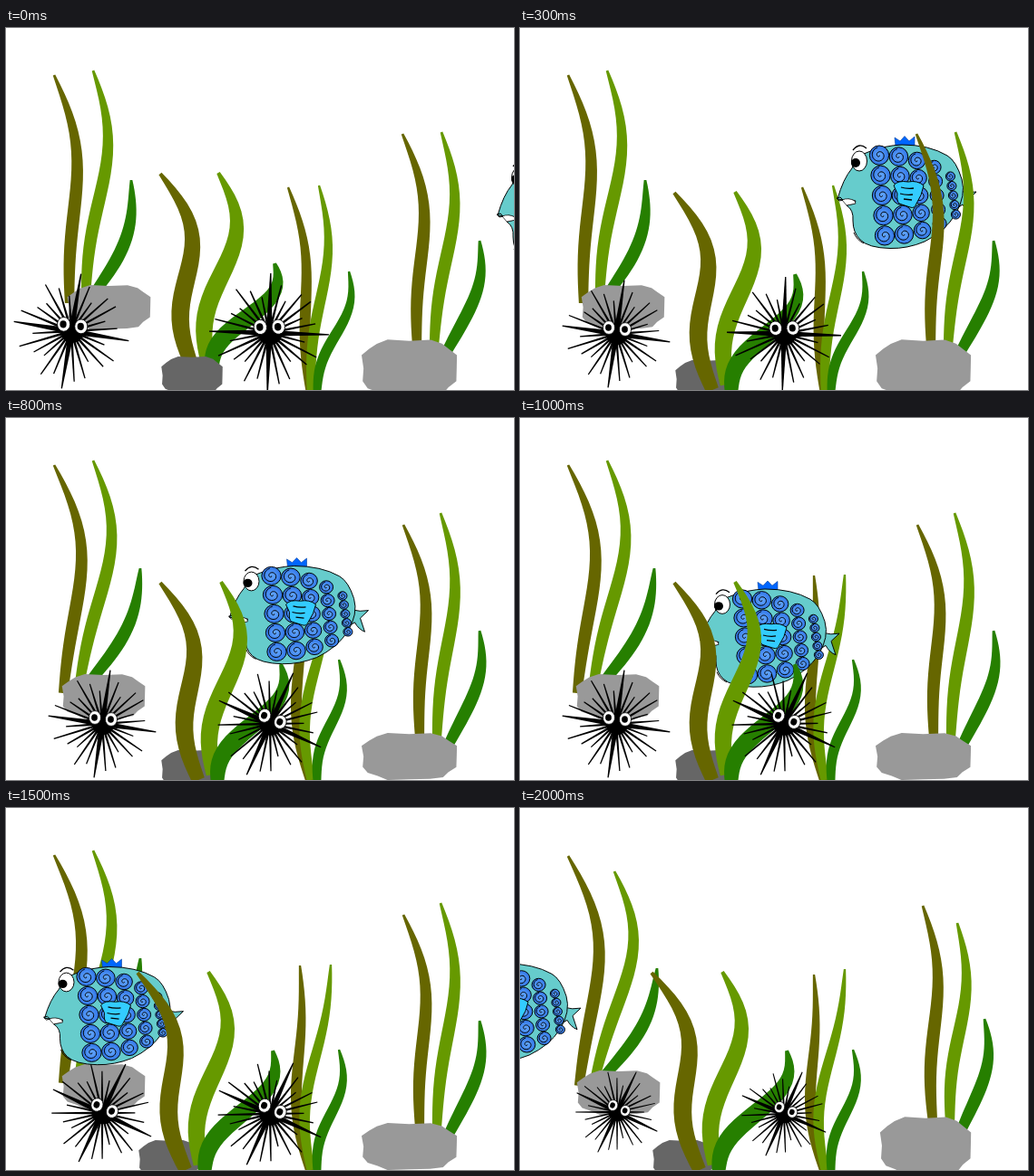
These frames come from a looping animation (560 by 400 pixels, 2100 ms). An HTML page with a canvas:

```html
<!DOCTYPE html>
<html lang="en">
<head>
<meta charset="utf-8">
<title>Reef</title>
<style>
  html, body { margin: 0; width: 100%; height: 100%; overflow: hidden; background: #fff; }
  canvas { display: block; }
</style>
</head>
<body>
<canvas id="stage" width="560" height="400"></canvas>
<script>
const ctx = document.getElementById('stage').getContext('2d');
const LOOP = 2100;
const WEED_COLORS = ['#666600', '#669900', '#267f00'];

// Each group has an olive, a green and a dark blade. Bends are [bow, curl].
// A pose sets the tips, moves the roots and scales the bow of the two tall blades.
const left = {
  width: 14,
  roots: [[70, 304], [88, 294], [95, 296]],
  bends: [[16, 6], [15, 7], [16, 0]],
  poses: [
    { tips: [[53, 52], [96, 47], [138, 168]], move: [0, 0], sway: 1 },
    { tips: [[53, 52], [96, 47], [148, 166]], move: [-7, 0], sway: 1.5 },
    { tips: [[53, 53], [104, 70], [151, 177]], move: [-5, 3], sway: 1.7 }
  ]
};
const middle = {
  width: 20,
  roots: [[212, 400], [228, 394], [233, 402]],
  bends: [[13, 14], [13, 14], [6, 14]],
  poses: [
    { tips: [[170, 161], [234, 160], [296, 260]], move: [-6, -24], sway: 1 },
    { tips: [[170, 182], [237, 181], [303, 272]], move: [0, 0], sway: 1 },
    { tips: [[145, 182], [223, 181], [294, 268]], move: [-14, 0], sway: 1 }
  ]
};
const near = {
  width: 12,
  roots: [[335, 402], [336, 400], [343, 402]],
  bends: [[8, 5], [9, 6], [5, 7]],
  poses: [
    { tips: [[311, 176], [345, 174], [378, 269]], move: [0, 0], sway: 1 },
    { tips: [[324, 174], [358, 173], [367, 267]], move: [0, 0], sway: -1 },
    { tips: [[324, 184], [358, 178], [367, 267]], move: [0, 0], sway: -1 }
  ]
};
const right = {
  width: 14,
  roots: [[453, 350], [472, 350], [481, 366]],
  bends: [[15, 6], [14, 6], [14, 2]],
  poses: [
    { tips: [[437, 117], [480, 115], [522, 235]], move: [0, 0], sway: 1 },
    { tips: [[438, 118], [479, 105], [522, 235]], move: [3, 2], sway: 1 },
    { tips: [[444, 108], [482, 127], [512, 233]], move: [2, -3], sway: 0.6 }
  ]
};

const BODY = new Path2D(`M294 199Q300 177 310 165Q314 151 328 147Q345 140 365 139Q395 139 415 151
  Q425 157 431 177Q436 195 424 216Q412 235 390 246Q371 254 352 253.5Q328 253 319 244Q311 236 311 223
  Q312 211 304 206L313 204L314 201Q306 198 300 200Z`);
const MOUTH = new Path2D('M299 200Q306 197 313 201L314 204L304 206Z');
const LIP = new Path2D('M293 198L297 197L300 200L296 201ZM312 236Q315 244 323 248');
const TAIL = new Path2D('M428 190Q438 193 447 191L438 200L443 216Q436 213 432 205L426 209Z');
const CROWN = new Path2D('M358 141L357 131L363 135L368 129.5L373 135L379 130L379 141Z');
const FIN = new Path2D('M356 184Q360 178 372 180Q382 178 389 184Q387 195 381 204Q379 210 374 208L362 204Q359 201 360 193Z');
const FIN_LINES = new Path2D('M364 186Q371 188 378 187M363 193Q370 195 377 194M367 199L376 200');
const BROW = new Path2D('M311 145Q318 136 326 143');

// Each pose is held and changes only what it names. Urchins: x, y, size, degrees.
const poses = [
  { at: 0, fish: [248, 8], tall: 1, left: 0, middle: 0, near: 0, right: 0,
    urchins: [[72, 335, 1.07, 1], [290, 337, 1.1, -7]] },
  { at: 100, fish: [152, -4], urchins: [[106, 338, 1.06, 0], [290, 338, 1.06, -7]] },
  { at: 300, fish: [56, -10], middle: 1, urchins: [[106, 338, 1, 0], [291, 338, 1.05, -7]] },
  { at: 500, fish: [0, 0], right: 1 },
  { at: 800, fish: [-47.5, 25], tall: 0.945, left: 1, near: 1,
    urchins: [[106, 338, 1, 0], [291, 338, 1.03, 16]] },
  { at: 1000, fish: [-95, 50.5] },
  { at: 1300, fish: [-123, 116], middle: 2, urchins: [[106, 337, 1, 17], [291, 338, 1.03, 16]] },
  { at: 1500, fish: [-251.5, 37] },
  { at: 1800, fish: [-316, 35], left: 2, right: 2, urchins: [[107, 336, 0.82, 17], [291, 338, 0.84, 15]] },
  { at: 2000, fish: [-380, 33.5], near: 2 }
];
poses.forEach((pose, i) => { poses[i] = { ...poses[i - 1], ...pose }; });

function paint(path, fill, stroke, width = 1) {
  if (fill) { ctx.fillStyle = fill; ctx.fill(path); }
  if (stroke) { ctx.strokeStyle = stroke; ctx.lineWidth = width; ctx.stroke(path); }
}

function ellipse(x, y, rx, ry = rx) {
  const path = new Path2D();
  path.ellipse(x, y, rx, ry, 0, 0, 7);
  return path;
}

function blade(tip, root, bow, curl, width, color) {
  const point = t => [
    tip[0] + (root[0] - tip[0]) * t + bow * Math.sin(Math.PI * t) + curl * Math.sin(2 * Math.PI * t),
    tip[1] + (root[1] - tip[1]) * t
  ];
  const path = new Path2D(), steps = 24;
  for (const side of [1, -1]) {
    for (let i = 0; i <= steps; i++) {
      const t = (side > 0 ? i : steps - i) / steps;
      const [x, y] = point(t), [nx, ny] = point(t + 0.01);
      const half = width / 2 * Math.sin(Math.PI * (0.03 + 0.75 * t)) ** 0.7;
      const k = side * half / Math.hypot(nx - x, ny - y);
      path.lineTo(x - (ny - y) * k, y + (nx - x) * k);
    }
  }
  paint(path, color);
}

function weeds({ width, roots, bends, poses }, index) {
  const { tips, move, sway } = poses[index];
  tips.forEach((tip, i) => {
    const root = [roots[i][0] + move[0], roots[i][1] + move[1]];
    const [bow, curl] = bends[i];
    blade(tip, root, i < 2 ? bow * sway : bow, curl, width, WEED_COLORS[i]);
  });
}

// A lumpy, squarish oval.
function rock(x, y, w, h, color) {
  const path = new Path2D();
  const squash = v => Math.sign(v) * Math.abs(v) ** 0.7;
  for (let i = 0; i < 20; i++) {
    const a = i / 20 * 2 * Math.PI, r = 0.48 + 0.02 * Math.sin(i * 2.4);
    path.lineTo(x + w * (0.5 + r * squash(Math.cos(a))), y + h * (0.5 + r * squash(Math.sin(a))));
  }
  paint(path, color);
}

function urchin([x, y, size, degrees]) {
  ctx.save();
  ctx.translate(x, y);
  ctx.rotate(degrees * Math.PI / 180);
  ctx.scale(size, size);
  for (let i = 0; i < 28; i++) {
    const thick = i % 7 === 0;
    const length = thick ? 60 : 46 + 10 * Math.sin(i * 4.3);
    const base = thick ? 3.2 : 1.4;
    ctx.save();
    ctx.rotate(0.15 + i / 28 * 2 * Math.PI);
    paint(new Path2D(`M0 ${-base}L${length} -.6V.6L0 ${base}Z`), '#000');
    ctx.restore();
  }
  paint(ellipse(1, 1, 12, 11), '#000');
  for (const [ex, ey] of [[-8, -7], [10, -5]]) {
    paint(ellipse(ex, ey, 6.6, 7.4), '#fff', '#000', 0.8);
    paint(ellipse(ex - 0.5, ey, 3.4, 3.8), '#000');
  }
  ctx.restore();
}

function scale(x, y, r) {
  const shade = ctx.createRadialGradient(x, y, 0, x, y, r);
  shade.addColorStop(0, '#66aaff');
  shade.addColorStop(1, '#2f74e6');
  paint(ellipse(x, y, r), shade, '#000');
  const spiral = new Path2D();
  for (let a = 0; a < 11; a += 0.3) {
    const d = r * a / 13;
    spiral.lineTo(x + d * Math.cos(a), y + d * Math.sin(a));
  }
  paint(spiral, null, '#000');
}

function fish([x, y], tall) {
  const top = 129.5;
  ctx.save();
  ctx.translate(x, y + top);
  ctx.scale(1, tall);
  ctx.translate(0, -top);
  paint(TAIL, '#66cccc', '#000');
  paint(CROWN, '#0066ff', '#003c99', 0.6);
  paint(BODY, '#66cccc', '#000');
  paint(MOUTH, '#fff', '#000', 0.7);
  paint(LIP, null, '#000');
  // Columns of scales shrink towards the tail.
  for (let col = 0; col < 5; col++) {
    const gap = 22.2 - 0.73 * col * col;
    for (let row = -2; row <= 2; row++) {
      scale(343 + 22 * col - 0.6 * col * col + 1.5 * row, 195 + gap * row, gap * 0.48);
    }
  }
  paint(FIN, '#33ccff', '#000');
  paint(FIN_LINES, null, '#000', 1.3);
  paint(ellipse(318, 157, 8.5, 11), '#fff', '#000');
  paint(ellipse(314, 159, 5), '#000');
  paint(BROW, null, '#000', 1.3);
  ctx.restore();
}

function draw(time) {
  const pose = poses.findLast(p => p.at <= time);
  ctx.fillStyle = '#fff';
  ctx.fillRect(0, 0, 560, 400);

  weeds(left, pose.left);
  rock(...[[66, 283], [60, 282], [61, 289]][pose.left], 95, 51, '#999');

  weeds(near, pose.near);
  fish(pose.fish, pose.tall);

  const stone = () => rock(pose.middle === 2 ? 145 : 170, pose.middle ? 366 : 362, 70, 44, '#666');
  if (pose.middle) stone();
  weeds(middle, pose.middle);
  if (!pose.middle) stone();

  weeds(right, pose.right);
  rock(...[[390, 343, 109, 66], [390, 347, 109, 54], [395, 340, 104, 66]][pose.right], '#999');

  pose.urchins.forEach(urchin);
}

function tick() {
  draw(performance.now() % LOOP);
  requestAnimationFrame(tick);
}
tick();
</script>
</body>
</html>
```
